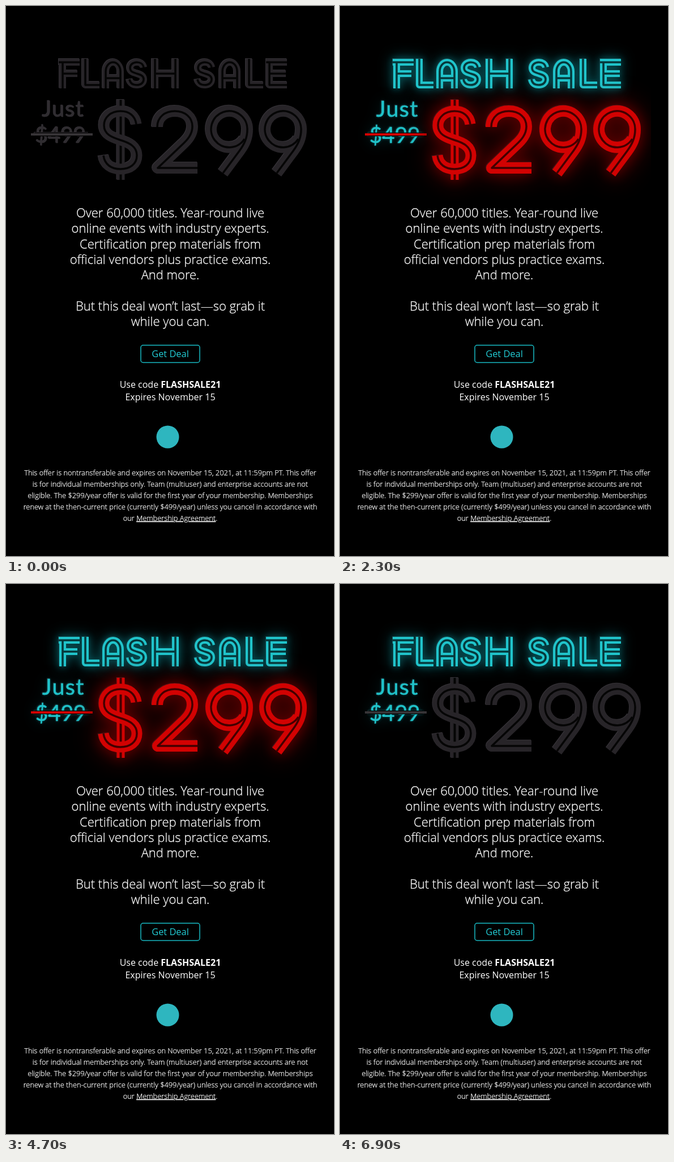
Animation of 579x968 px, one loop 7 s. Source, as an HTML page:

```html
<!DOCTYPE html>
<html lang="en">
<head>
<meta charset="utf-8">
<title>Flash Sale</title>
<style>
  html, body { margin: 0; width: 100%; height: 100%; overflow: hidden; background: #000; }
  svg { display: block; width: 579px; height: 968px; }
  text { font-family: "Open Sans", sans-serif; text-anchor: middle; fill: #fff; }
  .body { font-size: 22px; font-weight: 300; stroke: #fff; stroke-width: .3; }
  .code { font-size: 16px; }
  .fine { font-size: 12.83px; font-weight: 300; stroke: #fff; stroke-width: .25; }
  .price text { font-family: Lato, sans-serif; text-anchor: start; fill: inherit; }
  .tube { fill: none; stroke-linejoin: round; }
  .dark { filter: drop-shadow(-.5px -.5px .5px #343136); }
  .cyan { filter: drop-shadow(0 0 6px #064a4f) drop-shadow(0 0 11px #06454a); }
  .soft { filter: drop-shadow(0 0 2px #054a4f) drop-shadow(0 0 11px #031d20); }
  .red { filter: drop-shadow(0 0 10px #560000) drop-shadow(0 0 20px #560000); }
</style>
</head>
<body>
<svg viewBox="0 0 579 968">
  <clipPath id="sign"><path d="M0 60H549V342H0z"/></clipPath>
  <g id="neon" clip-path="url(#sign)"></g>
  <g id="copy"></g>
  <rect x="238" y="597" width="104" height="30.5" rx="4" fill="none" stroke="#18bac3" stroke-width="1.5"/>
  <text x="290" y="618" style="font-size:16.4px;fill:#22ccd5">Get Deal</text>
  <text class="code" x="290" y="672">Use code <tspan font-weight="700">FLASHSALE21</tspan></text>
  <text class="code" x="290" y="694">Expires November 15</text>
  <circle cx="285.500" cy="758.500" r="20" fill="#2eb6bf"/>
</svg>
<script>
const LOOP = 7000, STEP = 100;
const GREY = "#272428", CYAN = "#20c4cb", RED = "#d20202";

const letterS = x => `M${x + 30} 108C${x + 29} 102 ${x + 24} 99 ${x + 18} 99
  C${x + 10} 99 ${x + 6} 104 ${x + 6} 109C${x + 6} 116 ${x + 12} 117 ${x + 18} 119
  C${x + 25} 121 ${x + 30} 123 ${x + 30} 129C${x + 30} 135 ${x + 25} 139 ${x + 18} 139
  C${x + 11} 139 ${x + 6} 136 ${x + 5} 129`;
const letterA = x => `M${x + 6} 145V115a13 16 0 0 1 26 0V145M${x + 6} 127H${x + 32}`;
const letterL = x => `M${x + 6} 93V139H${x + 31}`;
const title = [
  "M93 99H130M100 99V145M100 119H126", letterL(134), letterA(170), letterS(213),
  "M263 93V145M299 93V145M263 119H299",
  letterS(333), letterA(376), letterL(423), "M459 99H496M465 99V139H496M465 119H494"
].join("");

const nine = x => `M${x + 27} 234A32 32 0 1 1 ${x + 32} 217C${x + 32} 233 ${x + 26} 244 ${x + 18} 255L${x - 11} 294`;
const dollarBars = "M202.500 165V306";
const dollarS = "M230 208C228 193 217 185 202 185C185 185 173 196 173 210C173 226 187 231 202 236"
  + "C219 241 231 248 231 263C231 278 219 287 202 287C186 287 174 279 172 263";
const two = "M267 213C267 195 281 185 298 185C316 185 329 196 329 212C329 226 320 236 310 245L268 285H338";

// A broad stroke hollowed by a thin one reads as twin neon tubes.
const tube = (d, width, gap, color, hollow) => `<g class="tube">
  <path d="${d}" stroke="${color}" stroke-width="${width}"/>
  <path d="${d}" stroke="${hollow}" stroke-width="${gap}"/></g>`;
const titleArt = (color, hollow) => tube(title, 12, 3.6, color, hollow);
const digits = [
  (c, h) => tube(dollarBars, 14, 4, c, h) + tube(dollarS, 19, 3.5, c, h),
  ...[two, nine(394), nine(489)].map(d => (c, h) => tube(d, 20, 3.5, c, h))
];
const prices = color => `<g class="price" fill="${color}" stroke="${color}" stroke-width=".5">
  <text x="64" y="195" font-size="39.5" letter-spacing="1.3">Just</text>
  <text x="52" y="241" font-size="38.5">$499</text></g>
  <path d="M50 226H146" stroke="#000" stroke-width="6.5"/>`;
const strike = color => `<path d="M44 226H153" stroke="${color}" stroke-width="4"/>`;
const lamp = (id, art) => `<g id="${id}">${art}</g>`;

document.getElementById("neon").innerHTML =
  `<g class="dark">${titleArt(GREY, "#050505")}${prices("#302d31")}
    ${digits.map(draw => draw(GREY, "#050505")).join("")}</g>`
  + lamp("cyan", `<g class="cyan">${titleArt(CYAN, "#06383b")}</g><g class="soft">${prices(CYAN)}</g>`)
  + strike("#373437")
  + lamp("strike", strike(RED))
  + `<g class="red">${digits.map((draw, i) => lamp("digit" + i, draw(RED, "#420000"))).join("")}</g>`;

const lines = (cls, first, leading, rows) => rows.map((row, i) =>
  row && `<text class="${cls}" x="290" y="${first + i * leading}">${row}</text>`).join("");
document.getElementById("copy").innerHTML =
  lines("body", 372, 27.25, [
    "Over 60,000 titles. Year-round live",
    "online events with industry experts.",
    "Certification prep materials from",
    "official vendors plus practice exams.",
    "And more.", "",
    "But this deal won’t last—so grab it",
    "while you can."])
  + lines("fine", 826, 19.95, [
    "This offer is nontransferable and expires on November 15, 2021, at 11:59pm PT. This offer",
    "is for individual memberships only. Team (multiuser) and enterprise accounts are not",
    "eligible. The $299/year offer is valid for the first year of your membership. Memberships",
    "renew at the then-current price (currently $499/year) unless you cancel in accordance with",
    'our <tspan text-decoration="underline">Membership Agreement</tspan>.']);

const setLevel = (id, level) => { document.getElementById(id).style.opacity = level; };
const between = (tick, from, to) => tick >= from && tick < to;

// Lamps warm up for one step, then stay lit until the sign goes out.
function glow(tick, start) {
  if (tick < start || tick > 49) return 0;
  return tick === start ? 0.25 : tick === 49 ? 0.5 : 1;
}

function render(now) {
  const tick = Math.floor(now % LOOP / STEP);
  const flicker = between(tick, 2, 5) || tick >= 64;
  setLevel("cyan", flicker ? 1 : glow(tick, 10));
  setLevel("strike", glow(tick, 10));
  digits.forEach((_, i) => setLevel("digit" + i, glow(tick, 8 + i)));
}

const began = performance.now();
function loop() {
  render(performance.now() - began);
  requestAnimationFrame(loop);
}
loop();
</script>
</body>
</html>
```
